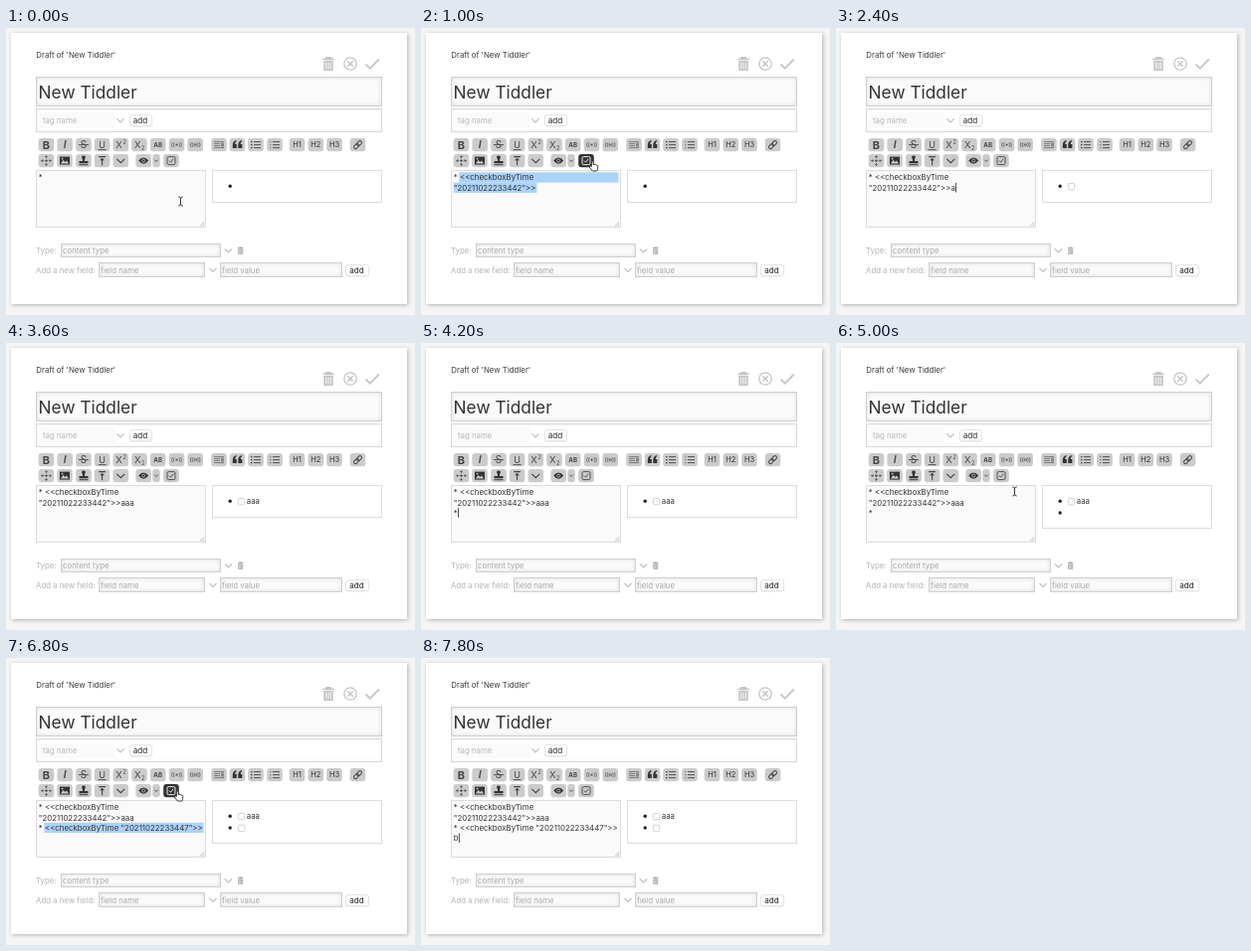
An HTML page for the animation above (8000 ms loop, 411 px wide and 289 px high).

```html
<!DOCTYPE html>
<html lang="en">
<head>
<meta charset="utf-8">
<style>
html, body { margin: 0; width: 100%; height: 100%; overflow: hidden; background: #f5f5f5; }
#stage { position: absolute; left: 0; top: 0; width: 411px; height: 289px; overflow: hidden; }
#stage div { position: absolute; box-sizing: border-box; }
.card { background: #fff; box-shadow: 1px 1px 4px rgba(0,0,0,.28); }
.field { background: #fafafa; border: 1px solid #cfcfcf; box-shadow: inset 0 0 4px rgba(0,0,0,.12); }
.area { background: #fafafa; border: 1px solid #dcdcdc; box-shadow: inset 0 0 2px rgba(0,0,0,.04); }
.tags { background: #fff; border: 1px solid #dadada; box-shadow: inset 0 0 3px rgba(0,0,0,.1); }
.soft { background: #fafafa; }
.plain { background: #fff; border: 1px solid #dcdcdc; }
.button { background: #fff; border: 1px solid #e6e6e6; border-radius: 3px; box-shadow: 0 .5px 1px rgba(0,0,0,.12); }
svg { position: absolute; left: 0; top: 0; }
text { font-family: Inter, Roboto, sans-serif; font-size: 7.8px; white-space: pre; }
</style>
</head>
<body>
<div id="stage"></div>
<script>
const stage = document.getElementById('stage');
const NS = 'http://www.w3.org/2000/svg';

function box(cls, x, y, right, bottom) {
  const el = document.createElement('div');
  el.className = cls;
  Object.assign(el.style, { left: x + 'px', top: y + 'px', width: right - x + 'px', height: bottom - y + 'px' });
  return stage.appendChild(el);
}

function add(parent, tag, attrs, content) {
  const el = document.createElementNS(NS, tag);
  for (const key in attrs) el.setAttribute(key, attrs[key]);
  if (content) el.textContent = content;
  return parent.appendChild(el);
}

box('card', 5, 5, 403, 278);
box('field', 30, 49, 378, 79);
box('tags', 30, 81, 378, 105);
box('soft', 34, 85, 109, 101);
box('button', 124, 87, 147, 99);
box('area', 30, 143, 201, 201);
const previewBox = box('plain', 207, 143, 378, 176);
box('field', 55, 217, 216, 231);
box('field', 93, 236, 200, 251);
box('field', 215, 236, 338, 251);
box('button', 341, 238, 365, 250);

const svg = add(stage, 'svg', { width: 411, height: 289, viewBox: '0 0 411 289' });
const label = (x, y, s, fill = '#333', size = 7.8, more = {}, parent = svg) =>
  add(parent, 'text', { x, y, fill, style: `font-size:${size}px`, ...more }, s);
const line = (parent, d, stroke = '#333', width = 1, more = {}) =>
  add(parent, 'path', { d, stroke, 'stroke-width': width, fill: 'none', ...more });
const solid = (parent, d, fill = '#333') => add(parent, 'path', { d, fill });

label(30.3, 30.3, "Draft of 'New Tiddler'", '#3a3a3a', 7.85);
label(32.6, 70.5, 'New Tiddler', '#333', 17.3);
label(37, 96, 'tag name', '#b8b8b8');
label(127.8, 96, 'add', '#222', 8.1);
label(30, 227, 'Type:', '#b4b4b4');
label(57, 227, 'content type', '#a8a8a8');
label(30, 246.5, 'Add a new field:', '#b4b4b4');
label(95, 246.5, 'field name', '#a8a8a8');
label(217, 246.5, 'field value', '#a8a8a8');
label(345.3, 246.5, 'add', '#222', 8.1);

const chevron = (x, y) => line(svg, `M${x - 3.6} ${y - 1.7}L${x} ${y + 1.9}L${x + 3.6} ${y - 1.7}`, '#bdbdbd', 1.2);
[[115, 93], [223.5, 224], [208, 243.5]].forEach(p => chevron(...p));

function trash(x, y, scale, color) {
  const g = add(svg, 'g', { transform: `translate(${x} ${y}) scale(${scale})` });
  solid(g, 'M-5.6-5.5h2.8v-1.5h5.6v1.5h2.8v1.5h-11.2zM-4.7-3.2h9.4v10.2h-9.4z', color);
  line(g, 'M-2.3-1.5v7M0-1.5v7M2.3-1.5v7', '#fff', .9);
}
trash(324, 36, 1, '#c4c4c4');
trash(235.7, 224.2, .52, '#a5a5a5');
add(svg, 'circle', { cx: 346, cy: 36, r: 6.2, fill: 'none', stroke: '#c4c4c4', 'stroke-width': 1.3 });
line(svg, 'M343.3 33.3l5.4 5.4m0-5.4l-5.4 5.4', '#c4c4c4', 1.5);
line(svg, 'M361.5 36.5l4.3 4.2l9-9.2', '#c8c8c8', 1.9);
line(svg, 'M195 199.5l4-4M197.5 199.5l1.5-1.5', '#999', .7);

// Toolbar icons are drawn around the centre of each button.
function tool(x, y, draw, width = 15.6) {
  const g = add(svg, 'g', { transform: `translate(${x} ${y})` });
  const face = add(g, 'rect', { x: -width / 2, y: -6.6, width, height: 13.2, rx: 3, fill: '#cbcbcb' });
  draw(g);
  return { g, face };
}
const INK = '#444';
const glyph = (s, size = 10, more = {}) => g =>
  label(0, size * .36, s, INK, size, { 'text-anchor': 'middle', ...more }, g);
const stroke = (d, width = 1) => g => line(g, d, INK, width);
const script = dy => g => {
  label(-1.8, 3.4, 'X', INK, 9.5, { 'text-anchor': 'middle' }, g);
  label(3.8, dy, '2', INK, 5.5, { 'text-anchor': 'middle' }, g);
};
const radio = fill => g => {
  line(g, 'M-2.4-2.2q-1.3 2.2 0 4.4M-4.2-2.6q-1.4 2.6 0 5.2M2.4-2.2q1.3 2.2 0 4.4M4.2-2.6q1.4 2.6 0 5.2', '#555', .7);
  add(g, 'circle', { r: 1.1, fill });
};
const list = marker => g => {
  line(g, 'M-5-3h1.5M-5 0h1.5M-5 3h1.5', marker, 1.3);
  line(g, 'M-2-3h7M-2 0h7M-2 3h7', INK, .9);
};
const wide = { 'font-weight': 500 };

[
  [40.5, glyph('B', 11, { 'font-weight': 700 })],
  [59.2, glyph('I', 10.5, { 'font-style': 'italic', 'font-weight': 600 })],
  [78, g => { glyph('S', 10)(g); line(g, 'M-5 0h10', INK, .9); }],
  [96.6, g => { glyph('U', 9)(g); line(g, 'M-4 5h8', INK, .9); }],
  [115.3, script(-.8)],
  [134, script(5.2)],
  [152.7, glyph('AB', 6.2, { 'font-weight': 700 })],
  [171.5, radio('#555')],
  [190.2, g => { radio('none')(g); line(g, 'M-1-1.8v3.6M1-1.8v3.6M-1 0h2', '#555', .7); }],
  [214, g => { line(g, 'M-5-3h10M-5-1h6M-5 1h6M-5 3h10', '#666', .8); solid(g, 'M2-2h3v4h-3z', '#888'); }],
  [232.5, g => solid(g, 'M-.7-3.7q-1.6.6-1.6 3.2h1.6v4h-4v-3q0-4 3.5-5zM4.8-3.7q-1.6.6-1.6 3.2h1.6v4h-4v-3q0-4 3.5-5z')],
  [251, list(INK)],
  [270, list('#888')],
  [292.5, glyph('H1', 7.4, wide)],
  [311.3, glyph('H2', 7.4, wide)],
  [330, glyph('H3', 7.4, wide)],
  [353.5, g => {
    for (const x of [-4.9, -.7])
      add(g, 'rect', { x, y: -1.7, width: 5.6, height: 3.4, rx: 1.7, fill: 'none', stroke: INK, 'stroke-width': 1, transform: 'rotate(-45)' });
  }],
].forEach(([x, draw]) => tool(x, 117.6, draw));

[
  [40.5, g => {
    for (const turn of [0, 90, 180, 270])
      line(g, 'M0-4.8v2.4M-1.2-3.6L0-4.8l1.2 1.2', INK, .8, { transform: `rotate(${turn})` });
    add(g, 'circle', { r: 1.2, fill: INK });
  }],
  [59, g => { solid(g, 'M-5-4h10v8h-10z'); solid(g, 'M-4 3l2.5-3.5l2 2l1.5-1.5l2 3z', '#ccc'); add(g, 'circle', { cx: -2.4, cy: -2, r: .9, fill: '#ccc' }); }],
  [78, g => solid(g, 'M-1-1q-2.2-4 1-4t1 4v1.3h3.5v2.4h-9v-2.4h3.5zM-4.5 3.6h9v1.1h-9z')],
  [96.6, stroke('M-3.4-4h6.8M0 4.6v-6.6M-1.8-.2L0-2l1.8 1.8', 1.1)],
  [115.3, stroke('M-4-1.7l4 3.8l4-3.8', 1.2)],
  [138.2, g => { solid(g, 'M-5 0q5-6.2 10 0q-5 6.2-10 0z'); add(g, 'circle', { r: 1.5, fill: '#333', stroke: '#ccc', 'stroke-width': .8 }); }],
].forEach(([x, draw]) => tool(x, 133.6, draw));
tool(151, 133.6, stroke('M-1.8-.9l1.8 1.8l1.8-1.8', .9), 7.5);
const checkIcon = tool(166, 133.6, g => {
  add(g, 'rect', { x: -4, y: -4, width: 8, height: 8, rx: 1.3, fill: 'none', stroke: INK, 'stroke-width': .9 });
  line(g, 'M-2 0l1.5 1.6L2.2-1.8', INK, .9);
});

// Editor and preview.
const selection = [0, 1].map(() => add(svg, 'rect', { fill: '#abd3fa' }));
const lineY = [153.4, 163.6, 174, 184.2];
const lines = lineY.map(y => label(32.8, y, '', '#333', 7.86));
const caret = add(svg, 'rect', { width: .8, height: 9.5, fill: '#222' });
const items = [159.2, 171].map(y => {
  const g = add(svg, 'g');
  add(g, 'circle', { cx: 225.2, cy: y, r: 1.7, fill: '#222' });
  const check = add(g, 'rect', { x: 233.3, y: y - 2.8, width: 6.5, height: 6.5, rx: 1.5, fill: '#fff', stroke: '#c4c4c4', 'stroke-width': .8 });
  return { g, check, text: label(241.8, y + 3, '', '#333', 7.8, {}, g) };
});

const beam = add(svg, 'g');
for (const [color, width] of [['#fff', 2.2], ['#222', .9]])
  line(beam, 'M-2.2-4.5q2 0 2.2 1.2q.2-1.2 2.2-1.2M0-3.5v7M-2.2 4.5q2 0 2.2-1.2q.2 1.2 2.2 1.2', color, width);
const hand = add(svg, 'g');
add(hand, 'path', {
  d: 'M-1.7-4.5q1-1 1.9 0v3q1-.6 1.7.2q1-.4 1.5.5q1.2-.1 1.3 1.1v2.2q-.1 1.3-1 2.5h-4.3q-1.5-2-3.2-4q-.3-1.5 1-1.2l1.1.8z',
  fill: '#fff', stroke: '#222', 'stroke-width': .9, 'stroke-linejoin': 'round',
});

const macro = '<<checkboxByTime';
const first = ['* ' + macro, '"20211022233442">>'];
const typed = s => [first[0], first[1] + s];
const second = `* ${macro} "20211022233447">>`;
const firstMark = [[38.3, 145.3, 160.2, 10.3], [32.8, 155.6, 83.7, 10.3]];
const secondMark = [[38.3, 165.8, 160.2, 10.3]];

// Each step changes only the listed parts of the state.
const steps = [
  [0, { text: ['*'], preview: [null], mark: [], caret: false, beam: [175.5, 174.5], hand: null, active: false }],
  [400, { beam: [175, 165] }],
  [600, { beam: [173, 149] }],
  [800, { beam: null, hand: [173, 139], active: true }],
  [1000, { text: first, mark: firstMark }],
  [1400, { preview: [''] }],
  [2000, { mark: [], caret: true, hand: null, active: false }],
  [2400, { text: typed('a') }],
  [2600, { text: typed('aa') }],
  [2800, { text: typed('aaa') }],
  [3200, { preview: ['aaa'] }],
  [3600, { caret: false }],
  [4000, { text: [...typed('aaa'), ''], caret: true }],
  [4200, { text: [...typed('aaa'), '*'] }],
  [4600, { preview: ['aaa', null], caret: false }],
  [4800, { beam: [180, 151] }],
  [5000, { beam: [179.5, 149.5] }],
  [5400, { beam: [176, 145] }],
  [5600, { beam: null, hand: [173, 140], active: true }],
  [5800, { hand: [173, 139] }],
  [6000, { text: [...typed('aaa'), second], mark: secondMark }],
  [6400, { preview: ['aaa', ''] }],
  [7000, { mark: [], caret: true, hand: null, active: false }],
  [7800, { text: [...typed('aaa'), second, 'b'] }],
];

const show = (el, on) => el.setAttribute('display', on ? 'inline' : 'none');

function place(el, at) {
  show(el, at);
  if (at) el.setAttribute('transform', `translate(${at})`);
}

function render(time) {
  const state = Object.assign({}, ...steps.filter(([at]) => at <= time).map(step => step[1]));

  lines.forEach((el, i) => el.textContent = state.text[i] || '');
  const last = state.text.length - 1;
  show(caret, state.caret);
  caret.setAttribute('x', 33.1 + lines[last].getComputedTextLength());
  caret.setAttribute('y', lineY[last] - 7.7);

  selection.forEach((el, i) => {
    const mark = state.mark[i];
    show(el, mark);
    if (mark) ['x', 'y', 'width', 'height'].forEach((key, k) => el.setAttribute(key, mark[k]));
  });

  items.forEach((item, i) => {
    const content = state.preview[i];
    show(item.g, content !== undefined);
    show(item.check, content != null);
    item.text.textContent = content || '';
  });
  previewBox.style.height = (state.preview.length > 1 ? 44 : 33) + 'px';

  checkIcon.face.setAttribute('fill', state.active ? '#333' : '#cbcbcb');
  checkIcon.g.querySelectorAll('[stroke]').forEach(el => el.setAttribute('stroke', state.active ? '#fff' : INK));
  place(beam, state.beam);
  place(hand, state.hand);
}

const start = performance.now();
function tick() {
  render((performance.now() - start) % 8000);
  requestAnimationFrame(tick);
}
tick();
</script>
</body>
</html>
```
